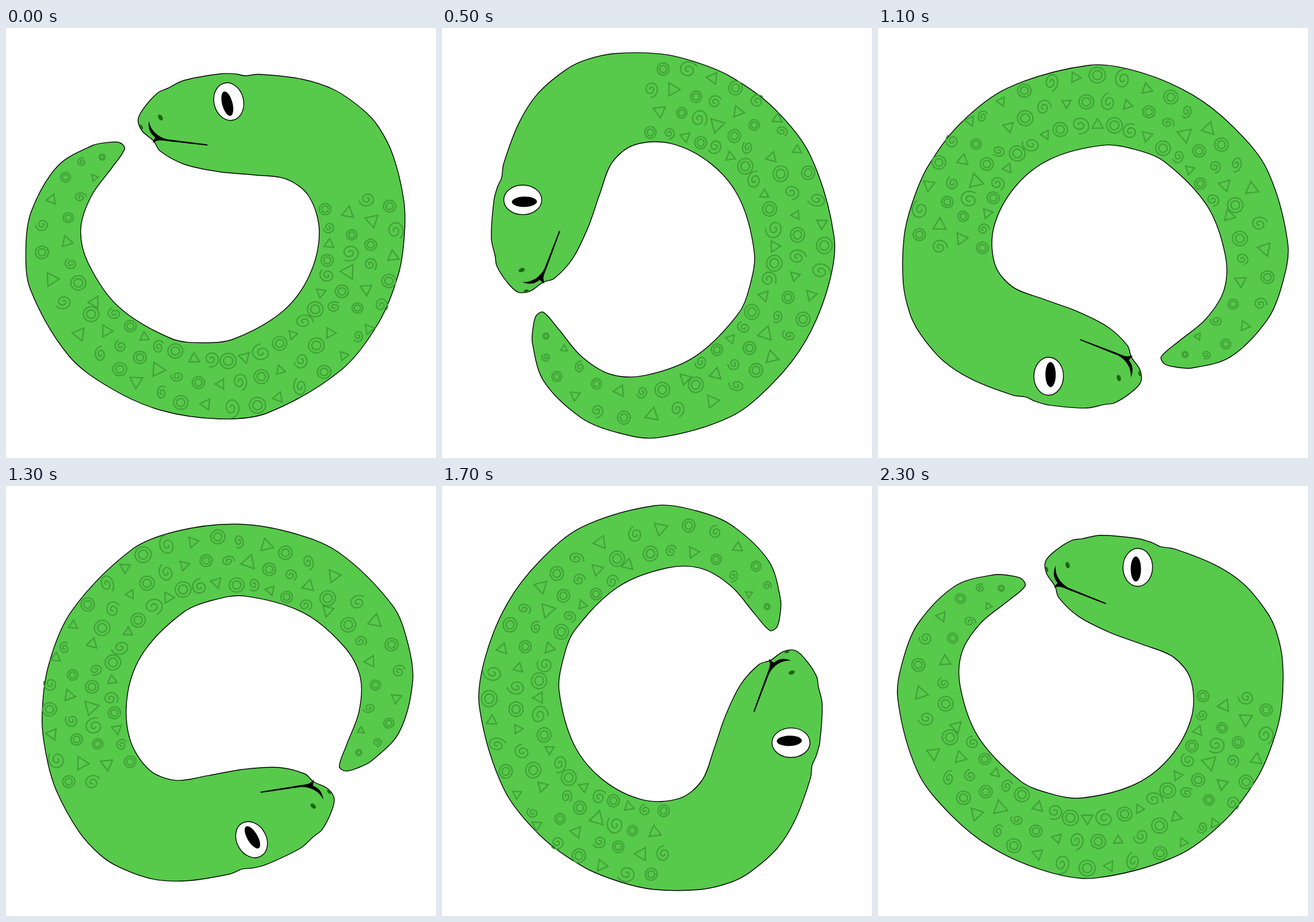
Recreate the animation shown at these times as an HTML page. Size 748 px wide and 748 px high, loop 2400 ms.

```html
<!DOCTYPE html>
<html lang="en">
<head>
<meta charset="utf-8">
<title>Turning snake</title>
<style>
  html, body { margin: 0; width: 100%; height: 100%; overflow: hidden; background: #fff; }
  svg { display: block; width: 100%; height: 100%; }
  #marks { fill: none; stroke: #3fa136; stroke-width: 2.2; }
</style>
</head>
<body>
<svg viewBox="0 0 748 748">
  <g id="snake">
    <path id="skin" fill="#57c94b" stroke="#000" stroke-width="1.4"/>
    <g id="marks"></g>
    <ellipse transform="translate(387.5 128) rotate(-14)" rx="25.7" ry="33" fill="#fff" stroke="#000" stroke-width="1.4"/>
    <ellipse transform="translate(385 131.6) rotate(-15)" rx="9" ry="21.8"/>
    <g fill="#1f6510">
      <ellipse transform="translate(268.6 155.7) rotate(-32)" rx="3.5" ry="5.6"/>
      <ellipse transform="translate(235.4 172.3) rotate(-25)" rx="2.3" ry="4.4"/>
    </g>
    <path d="M350.5 202.4 L280 193.5 C264 189 252 179 248.6 162 C246.5 175 251 184 259.5 190 C258 194 256 197 255 199.5 L262 196.5 C268 194 276 196.5 290 197.8 L350.5 204.4 Z"/>
  </g>
</svg>
<script>
const NS = 'http://www.w3.org/2000/svg';
const CX = 373.6, CY = 373.4, STEP = 100, STEPS = 24;
const RAD = Math.PI / 180;
const snake = document.getElementById('snake');
const marks = document.getElementById('marks');

// key points of the outline, clockwise from the mouth
const head = '257,197 236,178 230,158 243,135 265,112 281,105 310,91 375,79.5 400,80 416,83 440,80.5 515,89 572,108 622,143 648,172';
const back = '673,221 692,300 693,360 683,427 648,513 583,595 455,669.5 372,680 269.5,665 183,627 109,570 42.5,455 34.5,385 44,319 90,240 150,204.5';
const tail = '178,199 198,199.5 206.5,210 185,242';
const belly = '148,293 130,350 143,409 196,485 287,540 342,547.5 396,541 480,494 527,432 545,355 527,293 488,263 430,255.5 370,250 310,237 268,214';

function smooth(text) {
  const p = text.split(' ').map(s => s.split(',').map(Number));
  const at = i => p[(i + p.length) % p.length];
  const len = (u, v) => Math.hypot(u[0] - v[0], u[1] - v[1]);
  // handle at b along the chord a-c, as long as a third of the next segment
  const handle = (a, b, c) => {
    const k = len(b, c) / (len(a, b) + len(b, c)) / 3;
    return [b[0] + (c[0] - a[0]) * k, b[1] + (c[1] - a[1]) * k];
  };
  const parts = p.map((b, i) => {
    const a = at(i - 1), c = at(i + 1), e = at(i + 2);
    return `C${handle(a, b, c)} ${handle(e, c, b)} ${c}`;
  });
  return `M${p[0]}${parts.join('')}Z`;
}

let seed = 7;
function random(lo, hi) {
  seed = (seed * 16807) % 2147483647;
  return lo + (hi - lo) * seed / 2147483647;
}

function add(tag, attrs) {
  const el = document.createElementNS(NS, tag);
  for (const key in attrs) el.setAttribute(key, attrs[key]);
  marks.appendChild(el);
}

function ring(cx, cy, r) {
  for (const k of [0.95, 0.55]) add('ellipse', { cx, cy, rx: r * k, ry: r * k * 0.96 });
}

function triangle(x, y, r) {
  const dir = random(0, 120);
  const pts = [0, 120, 240].map(a => {
    const t = (dir + a) * RAD;
    return [x + r * Math.cos(t), y + r * Math.sin(t)];
  });
  add('polygon', { points: pts.join(' ') });
}

function spiral(x, y, r) {
  const dir = random(0, 360), wide = random(0.85, 1.15), turn = 640;
  const pts = [];
  for (let a = 0; a <= turn; a += 16) {
    const t = (dir + a) * RAD, k = r * (0.12 + a / turn);
    pts.push([x + wide * k * Math.cos(t), y + k / wide * Math.sin(t)]);
  }
  add('polyline', { points: pts.join(' ') });
}

// rows of marks from the neck round to the tail, fewer and smaller as the body narrows
function scatter() {
  const kinds = [ring, spiral, triangle];
  const gap = 8.6;
  for (let row = 0; row < 28; row++) {
    const a = -17 + row * gap;
    const half = 76 * Math.pow((235 - a) / 252, 0.4);
    const mid = 245 + 45 * Math.exp(-(((a - 180) / 30) ** 2));
    const lanes = Math.round(half / 20);
    for (let i = 0; i < lanes; i++) {
      const t = (a + (i % 2) * gap / 2 + random(-0.8, 0.8)) * RAD;
      const d = mid + half * ((2 * i + 1) / lanes - 1) + random(-3, 3);
      const size = random(9, 15) * Math.min(1, half / 50);
      kinds[(row + i * 2) % 3](CX + d * Math.cos(t), CY + d * Math.sin(t), size);
    }
  }
}

// each quarter turn repeats the same small sway around the centre
function pose(step) {
  const quarter = Math.floor(step / 6) * 90;
  const part = step * 15 - quarter;
  const sway = Math.sin(2 * part * RAD);
  const dx = -1.9 * Math.sin(4 * part * RAD), dy = -6.3 * sway * sway;
  const full = step * 15 * RAD;
  const lead = 1.7 * Math.abs(Math.sin(full)) * Math.sin(full / 2);
  snake.setAttribute('transform',
    `translate(${CX} ${CY}) rotate(${-quarter}) translate(${dx} ${dy}) ` +
    `rotate(${-part - lead}) translate(${-CX} ${-CY})`);
}

function frame() {
  const step = Math.floor(performance.now() / STEP) % STEPS;
  pose(step === 1 ? 2 : step); // the second pose is skipped, the third holds twice as long
  requestAnimationFrame(frame);
}

document.getElementById('skin').setAttribute('d', smooth([head, back, tail, belly].join(' ')));
scatter();
frame();
</script>
</body>
</html>
```
